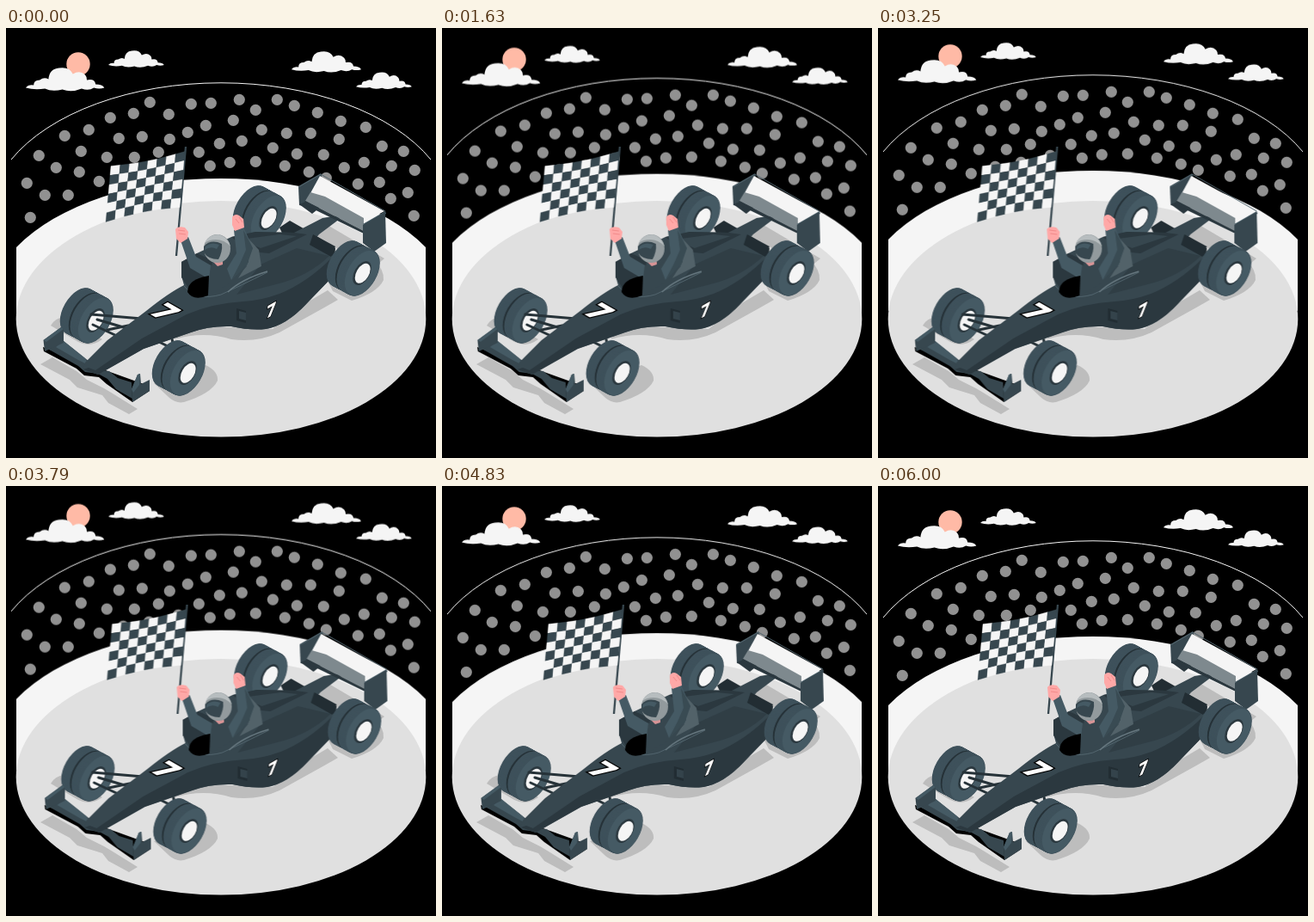
An HTML page that plays this animation: 500x500 px, repeating every 6.04 s.

```html
<!DOCTYPE html>
<html lang="en">
<head>
<meta charset="utf-8">
<title>Race winner</title>
<style>
  html, body { margin: 0; width: 100%; height: 100%; overflow: hidden; background: #000; }
  svg { display: block; width: 100%; height: 100%; }
  /* six seconds of motion, then a 40 ms hold */
  #stands { animation: drift 6040ms linear infinite; }
  #car { animation: shake 6040ms linear infinite; }
  @keyframes drift {
    0%, 99.34%, 100% { transform: translateY(0); }
    49.67% { transform: translateY(-10px); }
  }
  @keyframes shake {
    0%, 99.34%, 100% { transform: translateX(0); }
    9.93%, 89.4% { transform: translateX(-1px); }
    19.87%, 79.47% { transform: translateX(2px); }
    29.8%, 49.67%, 69.54% { transform: translateX(-4px); }
    39.74%, 59.6% { transform: translateX(4px); }
  }
  text { font-family: "Open Sans", "Liberation Sans", sans-serif; font-weight: 800; fill: #fff; }
  .white { fill: #f5f5f5; }
  .light { fill: #455a64; }
  .mid { fill: #37474f; }
  .deep { fill: #2b383f; }
  .dark { fill: #222d33; }
  .skin { fill: #ffa8a7; }
  .rod { fill: none; stroke: #263238; stroke-width: 3; stroke-linecap: round; }
  .edge { fill: none; stroke: #53666f; stroke-width: 1; }
</style>
</head>
<body>
<svg viewBox="0 0 500 500">
  <defs>
    <g id="wheel"></g>
    <path id="cloud" class="white" d="M0 24Q3 20 9 21Q9 15 16 15Q21 11 26 14Q27 2 38 1Q50-1 54 8Q62 3 68 9Q70 11 70 15Q79 13 80 20Q88 20 90 24Q84 26 78 24Q72 28 64 25Q52 30 42 26Q30 29 22 25Q10 27 0 24Z"/>
  </defs>

  <g id="stands">
    <circle cx="84" cy="42" r="13.7" fill="#ffbaa6"/>
    <use href="#cloud" transform="translate(23 45.5) scale(1.015 1)"/>
    <use href="#cloud" transform="translate(119 25.8) scale(.72)"/>
    <use href="#cloud" transform="translate(332 26.6) scale(.9)"/>
    <use href="#cloud" transform="translate(407 51) scale(.72)"/>
    <path d="M6 153A270 156 0 0 1 494 153" fill="none" stroke="#f5f5f5"/>
    <g id="crowd" fill="#919191"></g>
    <path class="white" d="M12 255A273 157 0 0 1 488 255V338H12Z"/>
  </g>

  <ellipse cx="250" cy="338.3" rx="238.3" ry="137.3" fill="#e0e0e0"/>

  <g fill="#bdbdbd">
    <path d="M40 391L54 383L82 399L94 409L114 419L124 425L153 443L143 449L119 436L112 427L83 418L74 409Z"/>
    <path d="M52 346Q57 337 68 336L112 362Q98 372 84 365Z"/>
    <path d="M172 413L232 392Q247 399 246 410Q239 425 207 435Q198 437 190 430Z"/>
    <path d="M196 362Q230 352 262 362Q292 366 318 354L372 324L386 316L374 305L345 322L310 350L210 346Z"/>
    <path d="M368 282L428 270Q440 281 439 293Q432 308 402 317L380 306Z"/>
    <path d="M352 240L372 228L440 268L428 278Z"/>
  </g>

  <g id="car">
    <use href="#wheel" x="263" y="184"/>
    <use href="#wheel" x="62" y="303"/>

    <!-- front suspension -->
    <path class="rod" d="M99 333L158 338M101 345L146 366M106 339L150 352M118 351L142 346M192 356L195 372M172 362L200 376"/>

    <!-- front wing -->
    <path d="M43 371L44 376L82 396L91 404L108 406L117 414L147 435L167 422L160 414L110 396Z"/>
    <path class="mid" d="M45 371L67 364L92 384L110 398L120 399L130 407L146 412L147 431L128 420L118 408L107 402L92 400L84 393Z"/>
    <path class="light" d="M67 364L92 384L96 392L84 386L58 371Z"/>
    <path class="mid" d="M43.500 363L64 348L67 350V366L45 376Z"/>
    <path class="light" d="M43.500 363L64 348L67 350L47 365Z"/>
    <path class="mid" d="M146 420L153 403L156 402L157 414L167 409V422L147 435Z"/>
    <path class="light" d="M146 420L153 403L156 402L155 415L148 424Z"/>

    <!-- body -->
    <path class="dark" d="M318 232L330 224L358 240L383 256L380 292L350 300Z"/>
    <path class="mid" d="M90 397L92 389L118 363L163 329Q189 308 207 299L204 288V272L222 262L262 243L290 237L335 238L368 221L386 218L388 222L364 240L354 252L379 265L377 292L350 320Q326 346 302 350Q285 352 262 347Q236 346 215 354L160 373L107 403Z"/>
    <path class="deep" d="M90 397L107 403L160 373L215 354Q236 346 262 347Q285 352 302 350Q326 346 350 320L377 292L378 268Q350 296 318 309Q296 317 276 318Q240 320 210 333L158 361L104 398L96 395Z"/>
    <path class="deep" d="M262 243L290 237L335 238L350 240L306 262L284 260Z"/>
    <path class="mid" d="M272 246L318 240L338 242L296 256Z"/>
    <path class="dark" d="M357 240L383 254L378 266L353 252Z"/>
    <path class="deep" d="M296 275L338 256L376 265Q352 288 318 297L268 310Z" opacity=".55"/>
    <path class="edge" d="M207 300Q222 318 250 310Q272 300 304 284" stroke="#2b383f"/>
    <path class="dark" d="M268 326L279 329V343L268 340Z"/>
    <path class="light" d="M271 329L279 331V340L271 338Z" opacity=".5"/>

    <!-- rear wing -->
    <path class="mid" d="M340 184L366 169L368 176L357 201L350 208L341 206Z"/>
    <path class="deep" d="M341 205L349 202L366 208L356 216Z"/>
    <path class="white" d="M365 172L440 213L416 226L354 192Z"/>
    <path d="M354 191L371 196L416 221V236L348 201Z" fill="#7e898e"/>
    <path class="deep" d="M348 201L416 236V239L346 205Z"/>
    <path class="light" d="M415 228L441 213L442 216L418 230Z"/>
    <path class="mid" d="M415 229L441 214L442 250L428 260L415 250Z"/>
    <path class="edge" d="M340 185L366 170L441 213"/>

    <!-- cockpit and driver -->
    <path class="deep" d="M204 272L222 262L240 270L238 291L212 302L204 290Z"/>
    <path d="M281 244L294 258L297 277L270 291L282 272Z" fill="#526269"/>
    <path class="mid" d="M233 274L250 279L268 267L280 277L262 296L240 309L235 300Z"/>
    <path class="light" d="M203 247L212 243L221 266L238 276L236 292L214 279Z"/>
    <path class="light" d="M265 235L276 231L287 256L280 276L262 293L257 280L268 262Z"/>
    <path class="deep" d="M276 235L287 256L280 276L262 293L272 274L279 258Z" opacity=".45"/>
    <path d="M211 307Q211 292 236 288L235 311Q218 318 211 307Z"/>
    <path d="M258 307Q274 292 304 283" fill="none" stroke="#66777f" stroke-width="1.500"/>
    <path class="skin" d="M240 271H252V275L246 277Z" fill-opacity=".8"/>
    <ellipse cx="245.500" cy="256.500" rx="15.500" ry="16.500" fill="#929a9d"/>
    <path d="M231 250Q236 240 247 240Q258 243 261 254Q254 246 244 246Q236 246 231 250Z" fill="#b7bdbf"/>
    <path class="mid" d="M230 254Q238 245 251 251Q252 260 247 269Q235 269 230 261Z"/>
    <path class="light" d="M232 254Q239 248 248 252L245 257Q238 253 231 258Z"/>

    <!-- flag -->
    <path d="M209 138L198 265" fill="none" stroke="#37474f" stroke-width="2.300"/>
    <g id="flag"></g>
    <path class="skin" d="M197 234Q200 230 208 232L212 237L211 245L203 250L198 245Z"/>
    <path d="M200 235L208 236M201 239L209 240" fill="none" stroke="#f28b8b"/>
    <path class="skin" d="M263 220Q266 215 271 218L276 222L277 232L266 236L263 229Z"/>
    <path d="M267 222L271 227M271 220L275 226" fill="none" stroke="#f28b8b"/>

    <text transform="matrix(.87 .5 -.87 .5 164.500 331)" font-size="36" stroke="#000" stroke-width="3" paint-order="stroke">7</text>
    <text transform="matrix(.87 -.5 -.12 1 302 338.500)" font-size="21" stroke="#000" stroke-width="1.500" paint-order="stroke">7</text>

    <use href="#wheel" x="372" y="248"/>
    <use href="#wheel" x="169" y="364"/>
  </g>
</svg>
<script>
  const add = (id, tag, attrs) => {
    const el = document.createElementNS("http://www.w3.org/2000/svg", tag);
    for (const key in attrs) el.setAttribute(key, attrs[key]);
    document.getElementById(id).append(el);
  };

  // spectators, as x,y pairs
  const crowd = `167,86 189,100 148,99 121,104 96,118 68,125 38,148 24,180 58,162 87,143 85,167
    45,194 72,194 28,220 108,178 117,150 131,128 158,126 149,150 177,144 190,129 211,121 232,113
    215,88 238,87 271,83 290,95 315,83 335,90 362,98 389,108 418,115 437,137 462,143 475,165
    448,160 434,179 467,191 447,198 474,218 409,181 416,156 393,162 387,129 369,147 354,122
    326,122 297,118 264,107 274,131 248,134 224,144 237,160 260,156 290,155 310,139 338,146
    324,160 352,167 372,174 166,165 136,170 200,157`;
  for (const dot of crowd.split(/\s+/)) {
    const [x, y] = dot.split(",").map(Number);
    add("crowd", "circle", { cx: x + 0.3, cy: y + 0.3, r: 6.6 });
  }

  // tyre: an ellipse swept along the axle
  const disc = (x, y, size, fill) => add("wheel", "ellipse", {
    rx: 17 * size, ry: 29.3 * size, fill, transform: `translate(${x} ${y}) rotate(30)`
  });
  const sweep = 40;
  for (let i = 0; i <= sweep; i++) {
    const k = 1 - i / sweep;
    const groove = k > 0.44 && k < 0.55;
    disc(42 - 20.5 * k, 37 - 11 * k, groove ? 0.985 : 1, groove ? "#263238" : "#3e515b");
  }
  disc(42, 37, 0.97, "#455a64");
  disc(42, 37, 0.52, "#2b383f");
  disc(42.7, 37.3, 0.43, "#f5f5f5");

  // chequered cloth
  const cols = 8, rows = 6;
  const point = (c, r) => {
    const u = c / cols, v = r / rows;
    const x = 122 + 86 * u - 6 * v;
    const y = 160.500 - 17 * u + 65 * v - 3 * v * Math.sin(Math.PI * u)
      + (1 - v) * 2.5 * Math.sin(Math.PI * u);
    return `${x.toFixed(1)},${y.toFixed(1)}`;
  };
  for (let r = 0; r < rows; r++) {
    for (let c = 0; c < cols; c++) {
      const fill = (r + c) % 2 ? "#37474f" : "#f5f5f5";
      const corners = [point(c, r), point(c + 1, r), point(c + 1, r + 1), point(c, r + 1)];
      add("flag", "polygon", { points: corners.join(" "), fill, stroke: fill, "stroke-width": 0.3 });
    }
  }
</script>
</body>
</html>
```
